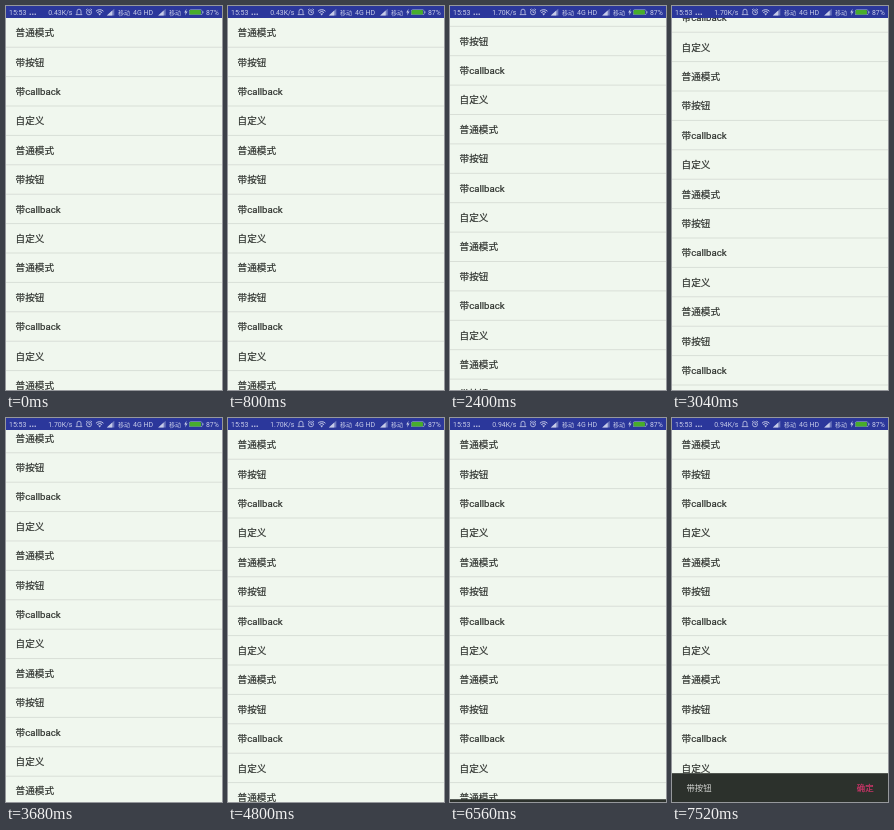
Recreate the animation shown at these times as an HTML page with a canvas. Size 216 by 384 pixels, loop 8 s.

```html
<!DOCTYPE html>
<html lang="zh-CN">
<head>
<meta charset="utf-8">
<title>Snackbar list</title>
<style>
  html, body { margin: 0; width: 100%; height: 100%; overflow: hidden; background: #f0f7ee; }
  canvas { display: block; width: 216px; height: 384px; }
</style>
</head>
<body>
<canvas id="stage"></canvas>
<script>
const W = 216, H = 384, LOOP = 8000, STEP = 160;
const BAR = 12, ROW = 29.4, SNACK = 28.8;
const FONT = 'Roboto, "Noto Sans CJK SC", "Noto Sans CJK", sans-serif';
const LABELS = ['普通模式', '带按钮', '带callback', '自定义'];

// time and scroll offset of the list
const SCROLL = [[1120, 0], [1440, 48.6], [2400, 138.5], [3040, 191.4], [4640, 0]];

const canvas = document.getElementById('stage');
const ctx = canvas.getContext('2d');
const scale = window.devicePixelRatio || 1;
canvas.width = W * scale;
canvas.height = H * scale;

const clamp = v => Math.max(0, Math.min(1, v));

// cubic-bezier(.4, 0, .2, 1)
function fastOutSlowIn(x) {
  let lo = 0, hi = 1;
  for (let i = 0; i < 20; i++) {
    const s = (lo + hi) / 2, r = 1 - s;
    if (1.2 * r * r * s + 0.6 * r * s * s + s * s * s < x) lo = s; else hi = s;
  }
  return lo * lo * (3 - 2 * lo);
}

function scrollAt(t) {
  if (t <= SCROLL[0][0]) return 0;
  for (let i = 1; i < SCROLL.length; i++) {
    const [t0, a] = SCROLL[i - 1], [t1, b] = SCROLL[i];
    if (t > t1) continue;
    const u = (t - t0) / (t1 - t0);
    const k = b < a ? u * u * (3 - 2 * u) : u;
    return a + (b - a) * k;
  }
  return 0;
}

function rect(x, y, w, h, color) {
  ctx.fillStyle = color;
  ctx.fillRect(x, y, w, h);
}

function pill(x, y, w, h, r, color) {
  ctx.fillStyle = color;
  ctx.beginPath();
  ctx.roundRect(x, y, w, h, r);
  ctx.fill();
}

// a hairline stroke gives the glyphs a slightly heavier weight
function text(str, x, y, size, color, align = 'left', weight = 0) {
  ctx.font = size + 'px ' + FONT;
  ctx.textAlign = align;
  ctx.fillStyle = ctx.strokeStyle = color;
  ctx.fillText(str, x, y);
  if (!weight) return;
  ctx.lineWidth = weight;
  ctx.strokeText(str, x, y);
}

function poly(color, ...p) {
  ctx.fillStyle = color;
  ctx.beginPath();
  for (let i = 0; i < p.length; i += 2) ctx.lineTo(p[i], p[i + 1]);
  ctx.fill();
}

function arc(x, y, r, from, to) {
  ctx.beginPath();
  ctx.arc(x, y, r, from * Math.PI, to * Math.PI);
  ctx.stroke();
}

function drawList(offset) {
  const first = Math.floor(offset / ROW);
  for (let i = first; i < first + 14; i++) {
    const y = BAR + i * ROW - offset;
    text(LABELS[i % 4], 9.6, y + 18.1, 9.6, '#2c302c', 'left', 0.2);
    rect(0, y + 28.7, W, 1, '#d9dfd7');
  }
}

function drawSignal(x) {
  poly('#6f79bd', x, 9.4, x + 7.5, 2.8, x + 7.5, 9.4);
  poly('#c6cbe8', x, 9.4, x + 5.5, 4.6, x + 5.5, 9.4);
}

function drawBell(x) {
  ctx.beginPath();
  ctx.moveTo(x - 3, 8.6);
  ctx.lineTo(x - 2, 7.4);
  ctx.lineTo(x - 2, 5.4);
  ctx.arc(x, 5.2, 2, Math.PI, 0);
  ctx.lineTo(x + 2, 7.4);
  ctx.lineTo(x + 3, 8.6);
  ctx.closePath();
  ctx.stroke();
}

function drawClock(x) {
  arc(x, 6.3, 2.5, 0, 2);
  ctx.beginPath();
  ctx.moveTo(x, 4.8);
  ctx.lineTo(x, 6.5);
  ctx.lineTo(x + 1.3, 6.5);
  ctx.moveTo(x - 3, 4);
  ctx.lineTo(x - 1.6, 2.8);
  ctx.moveTo(x + 3, 4);
  ctx.lineTo(x + 1.6, 2.8);
  ctx.stroke();
}

function drawStatus(speed) {
  const ink = '#c6cbe8';
  rect(0, 0, W, BAR, '#2b379b');
  text('15:53', 3, 8.8, 7, ink);
  for (let i = 0; i < 3; i++) rect(23.6 + i * 2.5, 7.6, 1.3, 1.3, ink);
  text(speed + 'K/s', 66.4, 8.8, 6.9, ink, 'right');

  ctx.strokeStyle = ink;
  ctx.lineWidth = 0.8;
  drawBell(73);
  drawClock(83);

  ctx.lineWidth = 1;
  arc(93.7, 9, 5.3, 1.25, 1.75);
  arc(93.7, 9, 3.4, 1.25, 1.75);
  poly(ink, 93.7, 9.4, 92.2, 7.6, 95.2, 7.6);

  drawSignal(100.8);
  text('移动', 112, 8.5, 6, ink);
  text('4G HD', 127, 8.8, 7, ink);
  drawSignal(152.2);
  text('移动', 163, 8.5, 6, ink);
  poly(ink, 180.6, 2.8, 178.2, 6.6, 179.7, 6.6, 179, 9.6, 181.6, 5.6, 180, 5.6);

  pill(183, 3.4, 13.4, 5.6, 1.6, '#a9bfd0');
  pill(196.4, 5.2, 1, 2, 0.4, '#a9bfd0');
  pill(183.5, 3.9, 12.4, 4.6, 1.2, '#2b379b');
  pill(183.6, 4, 11.4, 4.4, 1.2, '#48ad2c');
  text('87%', 200, 8.8, 6.9, ink);
}

function drawSnackbar(t) {
  const start = 6490, span = 400;
  if (t < start) return;
  const y = H - SNACK * fastOutSlowIn(clamp((t - start) / span));
  rect(0, y, W, SNACK, '#2c312c');
  ctx.globalAlpha = clamp((t - start - 110) / 290);
  text('带按钮', 14.4, y + 17.6, 8.4, '#d2d4d1');
  text('确定', 201.6, y + 17.6, 8.4, '#d2356b', 'right', 0.2);
  ctx.globalAlpha = 1;
}

function draw(t) {
  ctx.setTransform(scale, 0, 0, scale, 0, 0);
  rect(0, 0, W, H, '#f0f7ee');
  drawList(scrollAt(t));
  drawStatus(t < 1120 ? '0.43' : t < 5760 ? '1.70' : '0.94');
  drawSnackbar(t);
}

const begin = performance.now();
function tick() {
  const t = (performance.now() - begin) % LOOP;
  draw(Math.floor(t / STEP) * STEP);
  requestAnimationFrame(tick);
}
tick();
</script>
</body>
</html>
```
